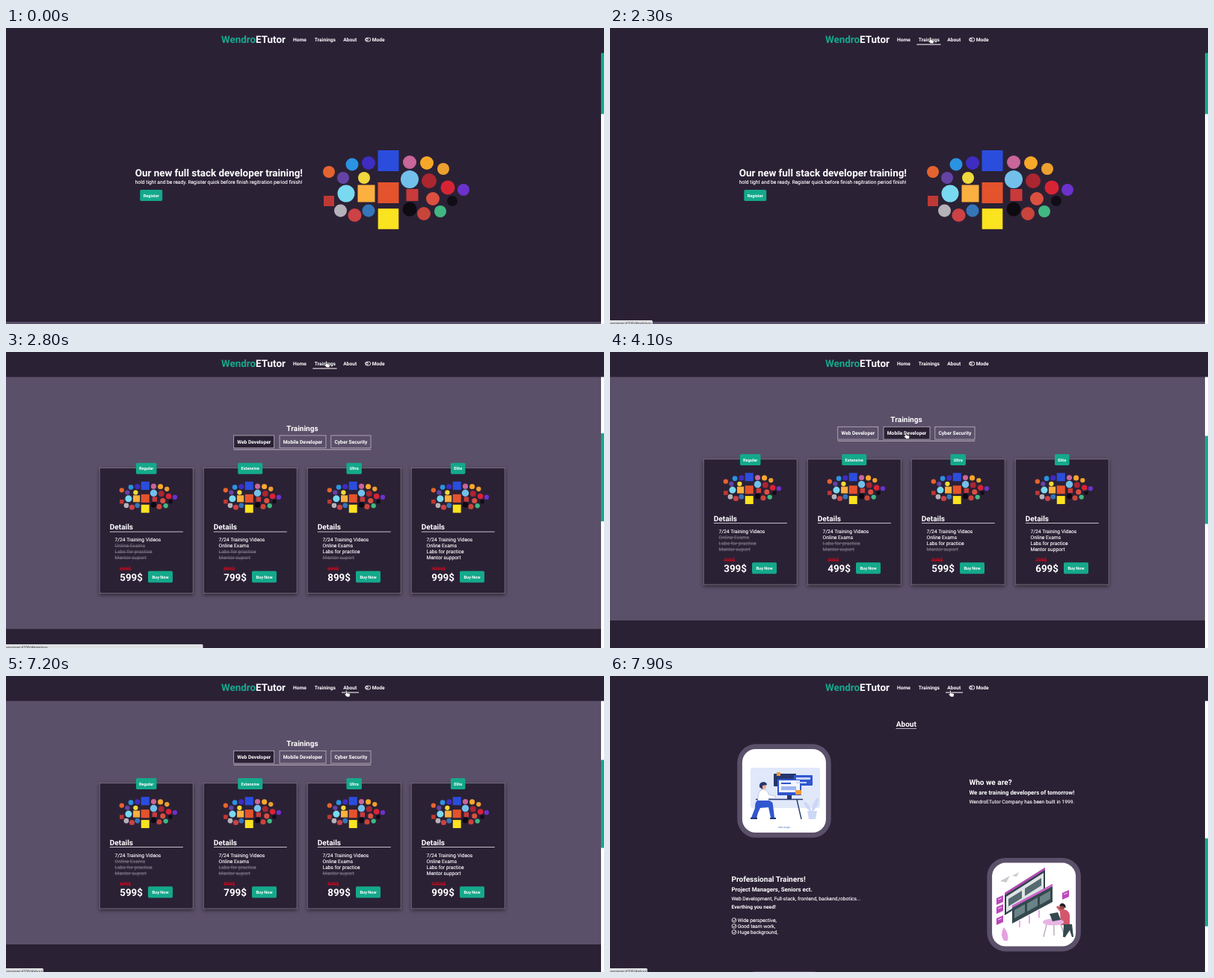
An HTML page for the animation above (8000 ms loop, 800 by 397 pixels).

```html
<!DOCTYPE html>
<html lang="en">
<head>
<meta charset="utf-8">
<title>Course site</title>
<style>
  html, body { margin: 0; height: 100%; overflow: hidden; background: #2b2135; }
  svg { display: block; width: 100vw; height: 100vh; }
  text {
    font: 6.7px Roboto, sans-serif; color: #fff; fill: currentColor;
    stroke: currentColor; stroke-width: .12; text-rendering: geometricPrecision;
  }
  .bold, .h1, .h2, .h3, .tiny { font-weight: 700; stroke: none; }
  .h1 { font-size: 13.4px; }
  .h2 { font-size: 10.05px; }
  .h3 { font-size: 7.84px; }
  .tiny { font-size: 5.58px; }
  .mid { text-anchor: middle; }
  .off { color: #77717f; text-decoration: line-through; }
  .old { color: #d3091c; text-decoration: line-through; }
  .dark { fill: #2b2135; }
  .purple { fill: #5b5069; }
  .green { fill: #14a98b; }
  .card { stroke: #827a8d; stroke-width: .8; filter: drop-shadow(0 2px 2.5px #0008); }
  .tab { stroke: #bdb6c4; stroke-width: .8; }
</style>
</head>
<body>
<svg id="stage" viewBox="0 0 800 397" preserveAspectRatio="none"></svg>
<script>
const text = (x, y, cls, str) => `<text x="${x}" y="${y}" class="${cls}">${str}</text>`;
const rect = (x, y, w, h, attrs = '', r = 0) =>
  `<rect x="${x}" y="${y}" width="${w}" height="${h}" rx="${r}" ${attrs}/>`;
const circle = (x, y, r, attrs) => `<circle cx="${x}" cy="${y}" r="${r}" ${attrs}/>`;
const path = (d, attrs) => `<path d="${d}" ${attrs}/>`;
const fill = color => `fill="${color}"`;
const line = (color, width = 1) => `fill="none" stroke="${color}" stroke-width="${width}"`;
const button = (x, y, w, h, label) =>
  rect(x, y, w, h, 'class="green"', 1.7) + text(x + w / 2, y + h / 2 + 2, 'tiny mid', label);

// Technology badges: centre, half size, colour
const squares = [
  [511.5, 178, 14, '#2a4ddd'], [511.5, 221, 14, '#e4532c'], [511.5, 256, 13.8, '#fae31f'],
  [482, 222, 11.5, '#fbb03f'], [543.5, 224, 8, '#c93a3a'], [432, 232, 7, '#bd3935'],
];
const discs = [
  [463, 183, 8.5, '#2b93e3'], [485, 181, 9, '#3e2dc0'], [540, 180, 9, '#c9669a'],
  [563, 181, 9, '#f7a829'], [585, 189, 8, '#eca02f'], [432, 193, 8, '#e4642f'],
  [451, 201, 8, '#6543a5'], [479, 201, 8, '#f0d93c'], [540, 203, 12, '#72c0ea'],
  [566, 205, 10, '#aa2630'], [591, 214, 9.5, '#d72435'], [612, 217, 8, '#6c32cc'],
  [455, 222, 11.5, '#79d9f0'], [571, 229, 9, '#dc5040'], [597, 232, 7, '#110d16'],
  [447.5, 245, 8.5, '#b6b2b9'], [466.5, 251, 9, '#cd4244'], [485, 245, 8.5, '#3476b8'],
  [540, 243, 9.5, '#0e0a12'], [559, 249, 9, '#c9443a'], [581, 246, 8, '#41b883'],
];
const logos = '<g id="logos">' +
  squares.map(([x, y, r, c]) => rect(x - r, y - r, 2 * r, 2 * r, fill(c))).join('') +
  discs.map(([x, y, r, c]) => circle(x, y, r, fill(c))).join('') + '</g>';

const hero = logos +
  text(172.7, 199, 'h1', 'Our new full stack developer training!') +
  text(172.7, 208.6, '', 'hold tight and be ready. Register quick before finish regitration period finish!') +
  button(179.3, 217, 29.9, 15, 'Register');

const courses = [
  { name: 'Web Developer', x: 304.7, w: 54, now: [599, 799, 899, 999], old: [699, 899, 999, 1099] },
  { name: 'Mobile Developer', x: 366, w: 62, now: [399, 499, 599, 699], old: [499, 599, 699, 799] },
  { name: 'Cyber Security', x: 434.8, w: 53.2, now: [499, 599, 699, 799], old: [599, 699, 799, 899] },
];
const plans = [['Regular', 27.5, 1], ['Extensive', 33, 2], ['Ultra', 20.5, 3], ['Elite', 19.5, 4]];

function card([name, width, included], i) {
  const items = ['7/24 Training Videos', 'Online Exams', 'Labs for practice',
    included > 3 ? 'Mentor support' : 'Mentor suport'];
  return `<g transform="translate(${125.2 + 139 * i} 0)">` +
    rect(0, 143.7, 125, 168.3, 'class="dark card"') +
    button(62.5 - width / 2, 137, width, 15, name) +
    `<use href="#logos" transform="translate(-141 97.4) scale(.395)"/>` +
    text(13.6, 226.5, 'h2', 'Details') + rect(13.6, 229, 98, .9, fill('#d6d3d9')) +
    items.map((item, k) => text(20.4, 242.7 + 8 * k, k < included ? '' : 'off', item)).join('') +
    text(27, 281.3, 'old', '') + text(27, 295.2, 'h1 now', '') +
    button(64.8, 282.2, 33, 15.3, 'Buy Now') + '</g>';
}

const trainings = rect(0, 0, 796, 360, 'class="purple"') +
  text(396.5, 94.3, 'h2 mid', 'Trainings') +
  courses.map(c => rect(c.x, 100.3, c.w, 16.8, 'class="tab"') +
    text(c.x + c.w / 2, 111.1, 'bold mid', c.name)).join('') +
  rect(304.5, 118.8, 183.7, .8, fill('#d0ccd4')) +
  plans.map(card).join('');

const frame = (x, y, art = '') => rect(x, y, 125.5, 125.5, 'class="purple"', 25) +
  rect(x + 6.7, y + 6.7, 112, 112, fill('#fff'), 18) + art;

const deskArt =
  rect(188, 123, 93, 54, fill('#e0e8fa'), 3) +
  rect(219, 131, 30, 17, fill('#25366f'), 1) + rect(246, 133, 25, 14, fill('#3157cf'), 1) +
  rect(224, 138, 32, 22, fill('#2f55cc'), 1) + rect(226, 140, 28, 16, fill('#f2f5ff')) +
  rect(229, 143, 13, 2, fill('#2f55cc')) + rect(229, 148, 20, 5, fill('#9eb5ee')) +
  rect(249, 136, 19, 3, fill('#c6d4fa')) + rect(249, 142, 14, 2, fill('#c6d4fa')) +
  rect(223, 129, 5, 5, fill('#f39a35')) + rect(248, 153, 8, 6, fill('#f39a35')) +
  path('M237 160h6v5h-6z', fill('#25366f')) +
  path('M195 165.5H258M201 166L195 192M250 166L256 192', line('#26376f', 1.4)) +
  path('M198 168q-1-15 7-16 6 0 7 7l9 2v3h-9v4z', fill('#fff') + ' stroke="#9dacd6" stroke-width=".6"') +
  path('M197 167h15q6 1 6 6l2 17h-5l-3-14-11 1-6 13h-6l5-13q0-8 3-10z', fill('#3157cf')) +
  circle(205, 148, 4, fill('#f2b08e')) + path('M200 149q-1-7 6-7 4 1 4 4l-6 1v5z', fill('#26376f')) +
  path('M188 191h9M214 191h8', line('#26376f', 2)) +
  path('M270 183q-11-7-11-15 8 2 11 15 0-16 9-20 2 10-9 20M264 181h13l-2 11h-9z', fill('#cbd7f5')) +
  `<text x="233" y="204" class="mid" style="font-size:3px;color:#8095dd">Web design</text>`;

const windowsArt =
  path('M522 275l13-7-5 9zM538 268l9-5-3 6z', fill('#c9c9cf')) +
  path('M528 291l54-34v30l-54 34z', fill('#2e4349')) +
  path('M530 296l50-32v22l-50 31z', fill('#dfe3e6')) +
  path('M528 291l54-34v3l-54 34z', fill('#bd47bd')) +
  path('M533 299l18-11v10l-18 11zM555 285l22-14v10l-22 14z', fill('#546a70')) +
  path('M538 308l54-29v24l-54 29z', fill('#33494e')) +
  path('M538 308l54-29v3l-54 29z', fill('#d260cf')) +
  path('M541 314l14-8v11l-14 8zM558 305l14-8v11l-14 8zM575 296l14-8v11l-14 8z', fill('#6b8287')) +
  path('M548 328v9M561 321v11M574 314v10', line('#d260cf')) +
  [[517, 295], [517, 307], [517, 322], [605, 288]].map(([x, y]) =>
    path(`M${x} ${y + 3}l9-4v9l-9 4z`, fill('#bd47bd')) +
    path(`M${x + 2} ${y + 5}l5-2`, line('#fff', .8))).join('') +
  path('M527 355q-6-8 0-18 7 9 5 18z', fill('#e3a1df')) +
  path('M584 333l-4 17M603 333l6 18M594 333v15', line('#9b8b9d')) +
  path('M602 316l-5-6 2-2 7 5q7 0 9 7v14h-12z', fill('#d4566c')) +
  circle(605, 309.5, 3.6, fill('#8b503f')) + path('M601 308q3-6 8-1l1 4-4-2z', fill('#251f2a')) +
  path('M607 333h11l2 17h-2l-3-9-6 9h-3z', fill('#33494e')) +
  `<ellipse cx="593" cy="330" rx="14" ry="4.5" ${fill('#e8b4e5')}/>` +
  path('M588 319l11-2 4 10-11 2z', fill('#33494e'));

const check = y => circle(166, y, 2.9, line('#fff', .8)) + path(`M164.4 ${y}l1.3 1.4 2.6-2.8`, line('#fff', .9));
const about = rect(0, 0, 796, 640, 'class="dark"') +
  text(396.3, 67.9, 'h2 mid', 'About') + rect(382.5, 70, 27.5, .8, fill('#d6d3d9')) +
  frame(170.2, 91.3, deskArt) + frame(504.4, 243.9, windowsArt) + frame(170.2, 396.3) +
  text(480.4, 145.8, 'h2', 'Who we are?') +
  text(480.4, 159, 'h3', 'We are training developers of tomorrow!') +
  text(480.4, 170.8, '', 'WendroETutor Company has been built in 1999.') +
  text(162.5, 275.5, 'h2', 'Professional Trainers!') +
  text(162.5, 289, 'h3', 'Project Managers, Seniors ect.') +
  text(162.5, 300.6, '', 'Web Development, Full-stack, frontend, backend,robotics...') +
  text(162.5, 311.9, 'bold', 'Everthing you need!') +
  ['Wide perspective,', 'Good team work,', 'Huge background,'].map((s, i) =>
    check(327.5 + 8 * i) + text(170.7, 329.9 + 8 * i, '', s)).join('');

const nav = [
  { label: 'Home', x: 384, from: 381, to: 405 },
  { label: 'Trainings', x: 412.8, from: 410.3, to: 442.6, link: 'trainings', status: 57 },
  { label: 'About', x: 451.2, from: 449, to: 472, link: 'about', status: 50 },
  { label: 'Mode', x: 489.7, from: 478, to: 509 },
];
const header = rect(0, 0, 800, 33.5, 'class="dark"') +
  `<text x="288" y="20.2" class="h1"><tspan class="green">Wendro</tspan>ETutor</text>` +
  nav.map(n => text(n.x, 18, 'bold', n.label)).join('') +
  rect(480.6, 13.2, 7.2, 4.8, line('#fff', .9), 2.4) + circle(483, 15.6, 1.4, line('#fff', .9)) +
  rect(0, 21.6, 0, 1, 'id="underline" fill="#fff"');

const outline = 'fill="#fff" stroke="#222" stroke-width=".5"';
document.getElementById('stage').innerHTML =
  `<g id="page">${hero}<g transform="translate(0 394)">${trainings}</g>
   <g transform="translate(0 754)">${about}</g></g>` +
  rect(796, 0, 4, 397, fill('#fff')) + rect(796, 0, 4, 118, 'id="thumb" class="green"') + header +
  `<g id="status">${rect(-3, 392, 60, 9, 'fill="#dedfe2"', 1.5)}
   <text x="-2.5" y="398.3" style="font-size:5px;color:#55565b"></text></g>
   <g id="cursor">${path('M0 0V8.6L2 6.8 3.4 9.8 4.6 9.2 3.3 6.4H6Z', outline)}
   ${path('M-.8.5C-.8-.5.8-.5.8.5V3.2L4.2 4Q5.2 4.3 5 5.4L4.3 8.3H.7L-2.3 5.2Q-2.3 4-.8 4.6Z', outline)}</g>`;

const $ = id => document.getElementById(id);
const [arrow, hand] = $('cursor').children;
const [statusBox, statusText] = $('status').children;
const tabs = [...document.querySelectorAll('.tab')];
const oldPrices = [...document.querySelectorAll('.old')];
const newPrices = [...document.querySelectorAll('.now')];

// Pointer stops: time, x, y
const stops = [
  [0, 806, 345], [100, 797, 335], [900, 497, 13], [1100, 490, 12.5], [1500, 428.3, 12.5],
  [3150, 428.3, 12.5], [3750, 395.7, 108.2], [4100, 395.7, 108.2], [4500, 461, 108.5],
  [5350, 461, 108.5], [5600, 397, 109], [5700, 397, 109], [6000, 341.3, 112.4],
  [6300, 341.8, 112.6], [6650, 341.8, 112.6], [7200, 455.3, 19.6], [8000, 455.3, 19.6],
];
const clamp = v => Math.min(1, Math.max(0, v));
const ease = v => v < .5 ? 4 * v ** 3 : 1 - 4 * (1 - v) ** 3;

function pointerAt(t) {
  const i = stops.findIndex(s => s[0] > t);
  const [t0, x0, y0] = stops[i - 1], [t1, x1, y1] = stops[i];
  const p = (t - t0) / (t1 - t0), k = p * p * (3 - 2 * p);
  return [x0 + (x1 - x0) * k, y0 + (y1 - y0) * k];
}

let shownTab = -1;
function selectTab(index) {
  if (index === shownTab) return;
  shownTab = index;
  tabs.forEach((tab, i) => tab.setAttribute('fill', i === index ? '#2b2135' : 'none'));
  plans.forEach((_, i) => {
    oldPrices[i].textContent = courses[index].old[i] + '$';
    newPrices[i].textContent = courses[index].now[i] + '$';
  });
}

function draw(t) {
  const scroll = 394 * ease(clamp((t - 2392) / 508)) + 360 * ease(clamp((t - 7400) / 508));
  $('page').setAttribute('transform', `translate(0 ${-scroll})`);
  $('thumb').setAttribute('y', scroll * .2922 - 2.6);
  selectTab(t < 3850 || t >= 6500 ? 0 : t >= 4750 && t < 5650 ? 2 : 1);

  const [x, y] = pointerAt(t);
  const hovered = nav.find(n => y > 6 && y < 22 && x > n.from && x < n.to);
  const onTab = t > 3150 && t < 7300 && y > 100 && y < 117 &&
    courses.some(c => x > c.x && x < c.x + c.w);
  $('cursor').setAttribute('transform', `translate(${x} ${y})`);
  hand.style.display = hovered || onTab ? '' : 'none';
  arrow.style.display = hovered || onTab ? 'none' : '';

  $('underline').setAttribute('x', hovered ? hovered.from : 0);
  $('underline').setAttribute('width', hovered ? hovered.to - hovered.from : 0);
  const link = hovered && hovered.link;
  $('status').style.display = link ? '' : 'none';
  if (link) {
    const wide = link === 'trainings' && t > 2650;
    statusBox.setAttribute('width', 3 + (wide ? 263.5 : hovered.status));
    statusText.textContent = 'devserver:4700/#' + link;
  }
}

const start = performance.now();
function tick() {
  draw((performance.now() - start) % 8000);
  requestAnimationFrame(tick);
}
tick();
</script>
</body>
</html>
```
